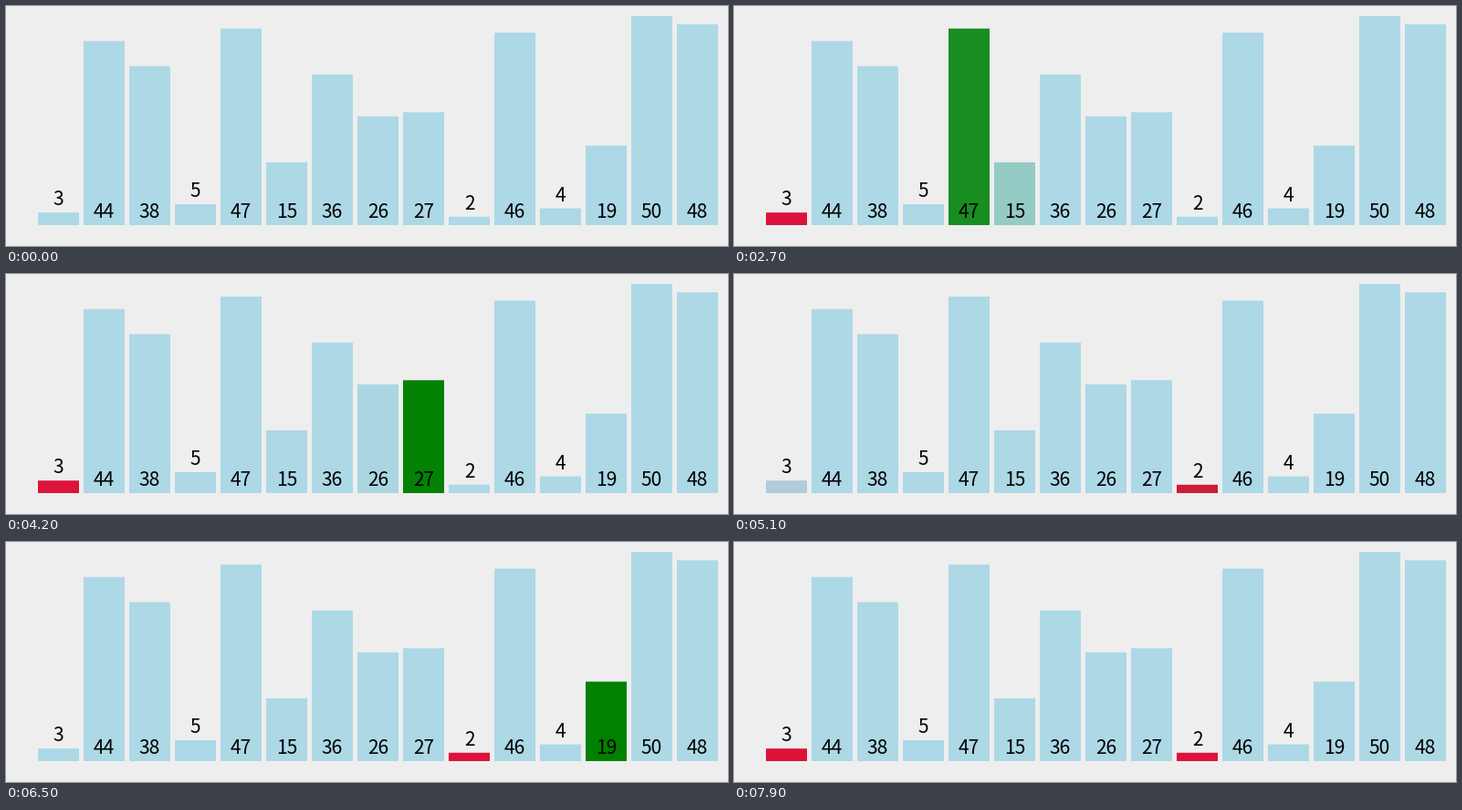
A matplotlib script for the animation above (8 s loop, 791 by 264 pixels).

```python
import matplotlib.pyplot as plt
import numpy as np
from matplotlib.animation import FuncAnimation
from matplotlib.colors import to_rgb

W, H, DPI = 791, 264, 100
FRAMES, INTERVAL = 80, 100
VALUES = [3, 44, 38, 5, 47, 15, 36, 26, 27, 2, 46, 4, 19, 50, 48]
BASE, LEFT, PITCH, BAR_W, UNIT = 241, 35, 50, 45, 4.6
FADE = 2.28  # length of a colour fade, in frames

IDLE, SCAN, BEST = (np.array(to_rgb(c)) for c in ("lightblue", "green", "crimson"))

# Start of each selection-sort step, in frames.
STARTS = [3.7, 8.05, 12.75, 17.05, 21.85, 26.25, 30.95, 35.7, 40.1,
          44.7, 49.3, 53.85, 58.36, 62.95, 67.7, 72.1, 76.75]


def selection_steps():
    """Colour changes {bar: colour} for one pass looking for the minimum."""
    best = 0
    steps = [{0: BEST}]
    scanned = None
    for i in range(1, len(VALUES)):
        change = {i: SCAN}
        if scanned is not None:
            change[scanned] = IDLE
        steps.append(change)
        scanned = i
        if VALUES[i] < VALUES[best]:
            steps.append({best: IDLE, i: BEST})
            best, scanned = i, None
    steps.append({scanned: IDLE, 0: BEST})
    return steps


STEPS = selection_steps()


def ease(u):
    u = min(max(u, 0), 1)
    return 4 * u**3 if u < 0.5 else 1 - 4 * (1 - u)**3


def colours_at(frame):
    colours = [IDLE] * len(VALUES)
    for start, change in zip(STARTS, STEPS):
        k = ease((frame - start) / FADE)
        for i, goal in change.items():
            colours[i] = colours[i] + (goal - colours[i]) * k
    return colours


fig = plt.figure(figsize=(W / DPI, H / DPI), dpi=DPI, facecolor="#eeeeee")
ax = fig.add_axes([0, 0, 1, 1])
ax.set(xlim=(0, W), ylim=(H, 0))
ax.axis("off")

lefts = LEFT + PITCH * np.arange(len(VALUES))
bars = ax.bar(lefts, [-UNIT * v for v in VALUES], BAR_W, bottom=BASE,
              align="edge", color=IDLE, linewidth=0, snap=False)
for x, v in zip(lefts, VALUES):
    foot = BASE if v > 5 else BASE - UNIT * v
    ax.text(x + BAR_W / 2, foot - 8, str(v), ha="center", va="baseline",
            family="Noto Sans CJK JP", size=21 * 72 / DPI, color="black")
ax.set(xlim=(0, W), ylim=(H, 0))


def update(frame):
    for bar, colour in zip(bars, colours_at(frame)):
        bar.set_facecolor(colour)
    return list(bars)


anim = FuncAnimation(fig, update, frames=FRAMES, interval=INTERVAL,
                     repeat=True, repeat_delay=0)
plt.show()
```
